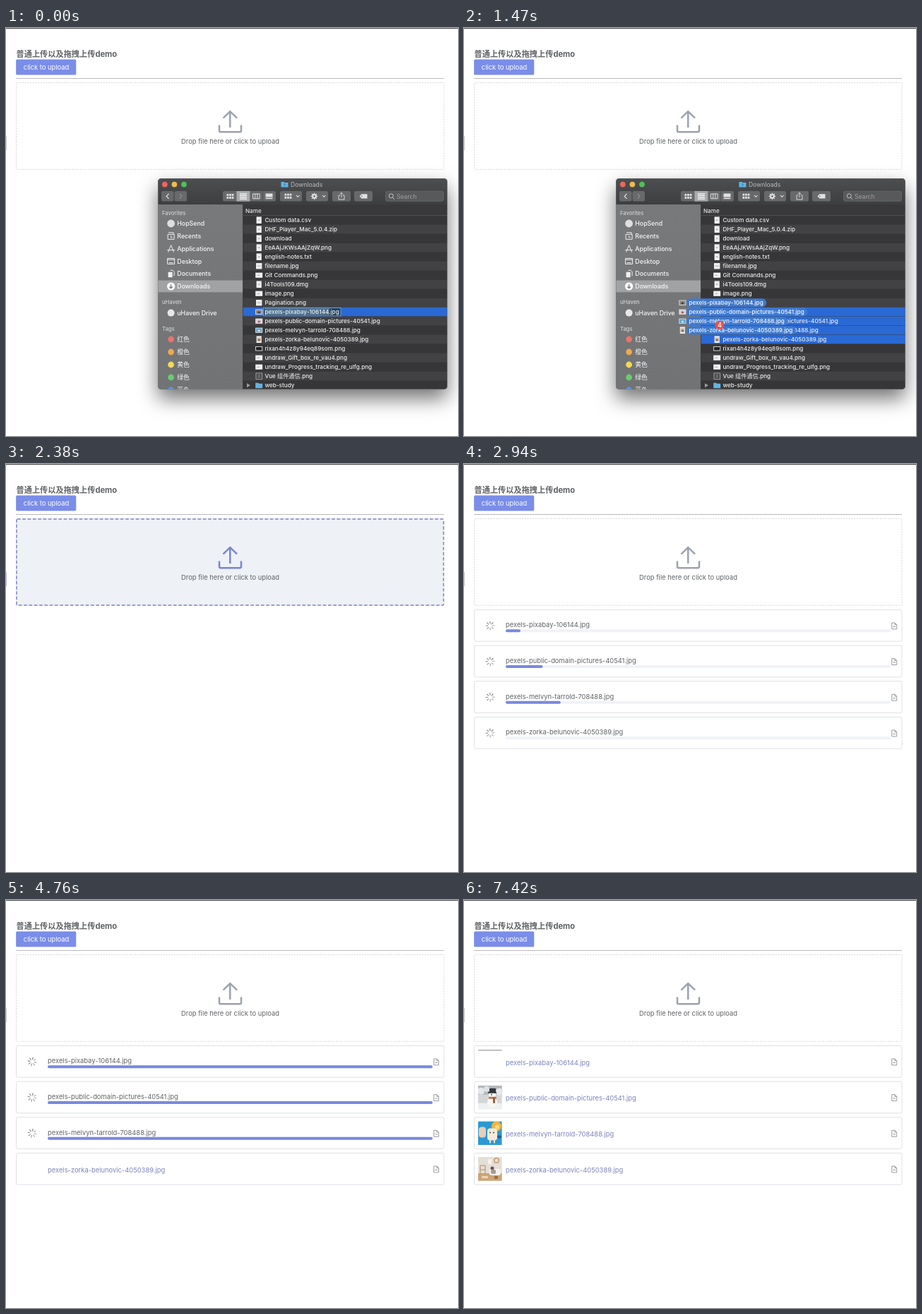
These frames come from a looping animation (640x578 px, 7.49 s). An HTML page:

```html
<!DOCTYPE html>
<html lang="zh">
<head>
<meta charset="utf-8">
<title>Upload demo</title>
<style>
  html, body { margin: 0; width: 100%; height: 100%; overflow: hidden; background: #fff; }
  svg { display: block; }
  text { font-family: Inter, "Noto Sans CJK SC", "Noto Sans CJK", sans-serif; white-space: pre; }
  #finder { filter: drop-shadow(0 13px 14px rgba(0, 0, 0, .55)); }
</style>
</head>
<body>
<svg id="stage" width="640" height="578" viewBox="0 0 640 578"></svg>
<script>
const LOOP = 7490, STEP = 70;

// Drawing helpers
const rect = (x, y, w, h, fill, r = 0, more = '') =>
  `<rect x="${x}" y="${y}" width="${w}" height="${h}" rx="${r}" fill="${fill}" ${more}/>`;
const dot = (x, y, r, fill) => `<circle cx="${x}" cy="${y}" r="${r}" fill="${fill}"/>`;
const line = (d, stroke, w = 1, more = '') =>
  `<path d="${d}" fill="none" stroke="${stroke}" stroke-width="${w}" ${more}/>`;
const label = (x, cy, s, size, fill, weight = 400, more = '') =>
  `<text x="${x}" y="${(cy + size * .36).toFixed(2)}" font-size="${size}" font-weight="${weight}" fill="${fill}" ${more}>${s}</text>`;
const group = (id, body, more = '') => `<g id="${id}" ${more}>${body}</g>`;
const at = (x, y, body) => `<g transform="translate(${x} ${y})">${body}</g>`;

const photos = [
  'pexels-pixabay-106144.jpg',
  'pexels-public-domain-pictures-40541.jpg',
  'pexels-melvyn-tarrold-708488.jpg',
  'pexels-zorka-belunovic-4050389.jpg'
];

// Page
function page() {
  return rect(0, 0, 640, 1, '#46474a') +
    rect(0, 153, 1, 20, '#c9cad0', 0, 'id="edge"') +
    label(14.5, 36.8, '普通上传以及拖拽上传demo', 11.2, '#606266', 700) +
    rect(14, 45.4, 85.5, 21.6, '#e4e7f5', 2) +
    rect(14.2, 44.6, 85, 21.6, '#7a8de8', 1.5) +
    label(24.8, 55.8, 'click to upload', 9.4, '#fff') +
    rect(14, 71, 606, 1, '#b9b9bb') +
    rect(14.5, 77.5, 605.5, 122.8, 'none', 1, 'stroke="#d8d9de" stroke-dasharray="2.2 1.5"') +
    group('hot', rect(15, 78, 604.5, 122, '#eef1f5', 1,
      'stroke="#7f84c8" stroke-width="1.5" stroke-dasharray="4.6 2.7"')) +
    line('M317.3 141V119M307.5 127.6L317.3 118.2L327.1 127.6M302 137.4V145.2Q302 147.2 304 147.2H331Q333 147.2 333 145.2V137.4',
      '#9ba2ae', 2.5, 'id="tray"') +
    label(248, 160.7, 'Drop file here or click to upload', 9.4, '#606266');
}

// Upload cards
const cardY = i => 206.5 + i * 50.67;

const pictures = [
  rect(0, 0, 34, 34, '#aaa3ad'),
  rect(0, 0, 34, 34, '#d3d6d9') + rect(0, 0, 34, 13, '#b3b8bd') +
    dot(4, 8, 5, '#e5e7e9') + dot(12, 5, 4, '#dfe2e4') + dot(30, 9, 5, '#e6e8ea') +
    rect(0, 25, 34, 9, '#eef0f1') + dot(20, 24, 7, '#f7f6f4') + dot(20, 13, 5, '#fbfaf8') +
    rect(16, 4, 9, 6, '#34363d', 1) + rect(14, 9, 12, 2, '#34363d') +
    rect(15, 16, 11, 3, '#c87543', 1) + rect(21, 17, 3, 8, '#9c5a3d') + dot(19, 13, 1, '#4a4543'),
  rect(0, 0, 34, 34, '#2c99d2') + dot(26, 7, 7, '#efb642') + dot(27, 8, 3, '#f8dc79') +
    rect(1, 8, 10, 15, '#e8cfb7', 4) + rect(13, 10, 14, 17, '#f3ead9', 4) +
    dot(17, 16, 1, '#4b4642') + dot(22, 16, 1, '#4b4642') +
    rect(16, 26, 2, 5, '#f0e3cf') + rect(22, 26, 2, 5, '#f0e3cf') + rect(27, 20, 6, 4, '#255a93', 2),
  rect(0, 0, 34, 34, '#e5ded7') + rect(0, 23, 34, 11, '#cda477') +
    rect(14, 3, 5, 7, '#f5f1ec') + dot(26, 5, 4, '#c39a72') + dot(26, 5, 2.5, '#eee2d3') +
    line('M3 25V12H10V25M3 18H10', '#b28b67') + rect(16, 17, 16, 9, '#f5f2ee', 3) +
    dot(20, 16, 2.5, '#66584e') + rect(18, 18, 7, 6, '#a79a90', 2) +
    rect(5, 27, 9, 3, '#ead6bd') + rect(23, 27, 5, 4, '#9b6c45')
];

function spinner() {
  let s = '';
  for (let k = 0; k < 8; k++)
    s += line('M0 -3.2V-6', '#65686e', 1.1, `transform="rotate(${k * 45})" opacity="${.55 + .05 * k}" stroke-linecap="round"`);
  return s;
}

function card(name, i) {
  const y = cardY(i);
  return rect(14.5, y, 605.5, 44.7, '#fff', 2, 'stroke="#dfe1e6"') +
    line(`M605.8 ${y + 18.5}h4.2l2.7 2.7v6.2h-6.9zM610 ${y + 18.5}v2.7h2.7M607.5 ${y + 24}h3.5`, '#8d8f94', .9) +
    group('busy' + i,
      at(37, y + 22.5, group('spin' + i, spinner())) +
      label(59, y + 21.6, name, 9.4, '#606266') +
      rect(59, y + 27.8, 545, 4, '#f1f2f7', 2) +
      rect(59, y + 27.8, 0, 4, '#7889df', 2, `id="bar${i}"`)) +
    group('done' + i, label(59, y + 23.8, name, 9.4, '#7a84bd')) +
    `<svg id="thumb${i}" x="20" y="${y + 5.6}" width="33.6" height="0">${pictures[i]}</svg>`;
}

// File manager: d = document, w = wide image, s = square, p = photo, k = dark frame, q = grid, f = folder
const files = [
  'd Custom data.csv', 'd DHF_Player_Mac_5.0.4.zip', 'd download', 'd EeAAjJKWsAAjZqW.png',
  'd english-notes.txt', 's filename.jpg', 'w Git Commands.png', 'd i4Tools109.dmg',
  'w image.png', 's Pagination.png', ...photos.map(n => 'p ' + n),
  'k rixan4h4z8y94eq89som.png', 'w undraw_Gift_box_re_vau4.png',
  'w undraw_Progress_tracking_re_ulfg.png', 'q Vue 组件通信.png', 'f web-study'
];
const FIRST = 10, FILE_SIZE = 8.17;
const rowY = k => 272.2 + 13 * k;
const photoTone = ['#8e857b', '#d9d3dc', '#5fa8d6', '#d3bda3'];

const folder = () => '<path d="M-5 -3.5h4l1 1h5v6.5h-10z" fill="#63b3e2"/>';

function fileIcon(kind, n = 0) {
  if (kind === 'd') return rect(-3.6, -4.8, 7.2, 9.6, '#f2f2f2') + rect(-1.5, -1, 3, 2, '#b9bbbd') + rect(1.6, -4.8, 2, 2, '#bfc1c3');
  if (kind === 's') return rect(-4.2, -4.2, 8.4, 8.4, '#efefef') + rect(-2.5, -1, 5, 2, '#c9cbcd');
  if (kind === 'w') return rect(-5, -3.6, 10, 7.2, '#f1f1f1') + rect(-3, -.5, 4, 1.2, '#b3b7bd');
  if (kind === 'k') return rect(-4.6, -2.8, 9.2, 5.6, '#222', 0, 'stroke="#e4e4e4" stroke-width=".9"');
  if (kind === 'q') return rect(-4.2, -4.2, 8.4, 8.4, '#3c3d3f', 0, 'stroke="#bbb" stroke-width=".8"') + line('M-3 -1.3H3M-3 1.3H3M0 -3V3', '#999', .7);
  if (kind === 'f') return folder();
  const tall = n === 3;
  return rect(tall ? -3.6 : -5, tall ? -4.8 : -3.6, tall ? 7.2 : 10, tall ? 9.6 : 7.2, '#f0f0f0') +
    rect(tall ? -2.8 : -4.2, -2.8, tall ? 5.6 : 8.4, 5.6, photoTone[n]) +
    rect(-1.5, -.5, 3, 2.5, ['#3d3f42', '#c2524e', '#f0e4cc', '#7e6b59'][n]);
}

function fileRow(entry, k) {
  const kind = entry[0], name = entry.slice(2), n = k - FIRST, y = rowY(k);
  const photo = n >= 0 && n < 4;
  return rect(335.5, y - 6.5, 289.5, 13, k % 2 ? '#424244' : '#363638') +
    (photo ? rect(335.5, y - 6.5, 289.5, 12.7, '#2a69d4', 0, `id="sel${n}"`) : '') +
    (n === 0 ? group('rename', rect(364.5, y - 5.8, 109.5, 11.6, '#24415f', 0, 'stroke="#6c9ee6"') +
      rect(366, y - 5.2, 92, 10.4, '#4d718f')) : '') +
    at(358.2, y, fileIcon(kind, n)) +
    (kind === 'f' ? `<path d="M341 ${y - 3}l5 3l-5 3z" fill="#9b9c9e"/>` : '') +
    label(366.4, y, name, FILE_SIZE, '#ededed', 500);
}

function toolbar() {
  const ink = '#e2e2e2', face = '#68696b';
  const button = (x, w) => rect(x, 231, w, 14.6, face, 2.5);
  const chevron = x => line(`M${x} 237l2.2 2.4l2.2 -2.4`, ink, 1.1);
  let s = dot(224.8, 221.6, 3.9, '#ee655e') + dot(238.4, 221.6, 3.9, '#eebb4a') + dot(252, 221.6, 3.9, '#4fc159') +
    at(394.5, 221.5, folder() + rect(-1, -1.2, 2, 3.2, '#3889be')) + label(403, 221.5, 'Downloads', 8.6, '#bcbdbe') +
    button(220, 17.5) + button(238.5, 17.5) +
    line('M230.5 235l-3.3 3.4l3.3 3.4', ink, 1.2) + line('M245.8 235l3.3 3.4l-3.3 3.4', '#8c8d8f', 1.2) +
    button(307, 75) + rect(326.5, 231, 18.8, 14.6, '#a9aaac') +
    button(388, 31) + button(425, 31) + button(462, 26) + button(493, 26) +
    line('M363.4 231v14.6', '#48494b', .7);
  for (let k = 0; k < 6; k++) s += rect(312.5 + k % 3 * 3.6, 235 + (k / 3 | 0) * 4, 2.7, 2.9, ink);
  for (let k = 0; k < 4; k++) s += rect(331, 234.4 + k * 2.4, 10, 1.2, '#fff');
  s += line('M349.5 235h9.6v6.8h-9.6zM352.7 235v6.8M355.9 235v6.8', ink) +
    rect(367.5, 234.5, 10, 5, ink) + rect(367.5, 240.6, 10, 1.6, ink);
  for (let k = 0; k < 6; k++) s += rect(394.5 + k % 3 * 3.6, 234.7 + (k / 3 | 0) * 4.2, 2.7, 2.9, ink);
  s += chevron(411) + chevron(448) + dot(436.5, 238.4, 3.4, ink) +
    line('M436.5 233.6v9.6M431.7 238.4h9.6M433.1 235l6.8 6.8M439.9 235l-6.8 6.8', ink, 1.1) + dot(436.5, 238.4, 1.3, face) +
    line('M473 237h-2v6h8v-6h-2M475 240v-6.5M473 235.2l2 -2l2 2', ink, .9) +
    `<path d="M500.5 238.4l3 -3.2h8v6.4h-8z" fill="${ink}"/>` + dot(503.8, 238.4, .8, face) +
    rect(537.5, 231.3, 82, 14, '#58595b', 2.5, 'stroke="#6b6c6e" stroke-width=".7"') +
    line('M547.6 240.3l2.4 2.6', '#c5c6c7', 1) + `<circle cx="545.3" cy="237.8" r="3" fill="none" stroke="#c5c6c7"/>` +
    label(553, 238.6, 'Search', 8.6, '#a0a1a3');
  return s;
}

function sidebar() {
  const ink = '#f0f0f0', stroke = d => line(d, ink, 1);
  const icons = [
    dot(0, 0, 5.4, '#dedfe0'),
    stroke('M-3.5 -5h7v2M-4.5 -2.5h9v7h-9zM0 -.5v2.5h2'),
    stroke('M0 -5L-4 5M0 -5L4 5M-5.5 2h11'),
    stroke('M-5 -4h10v8h-10zM-5 -2.2h10M-3 2.2h6'),
    rect(-4, -2.5, 6, 7.5, ink) + stroke('M-1 -5h3.5l2 2v6'),
    dot(0, 0, 5.6, '#fff') + line('M0 -3v5.4M-2.3 .5l2.3 2.3l2.3 -2.3', '#77797b', 1.3)
  ];
  const names = ['HopSend', 'Recents', 'Applications', 'Desktop', 'Documents', 'Downloads'];
  const tags = [['红色', '#ed726a'], ['橙色', '#f0a950'], ['黄色', '#f3d959'], ['绿色', '#69cd6e'], ['蓝色', '#5a97ec']];
  const head = (y, s) => label(221, y, s, 7.6, '#cfd0d1', 500);
  const item = (y, s) => label(242.3, y, s, 8.8, '#f6f6f6', 500);
  return rect(215, 250, 120.5, 262, 'url(#side)') + rect(215, 357.5, 120.5, 16.8, '#a1a2a4') +
    head(261.8, 'Favorites') +
    names.map((n, i) => at(233.6, 277 + i * 17.8, icons[i]) + item(277 + i * 17.8, n)).join('') +
    head(388, 'uHaven') + at(233.6, 403.6, dot(0, 0, 5, '#e6e7e8')) + item(403.6, 'uHaven Drive') +
    head(426, 'Tags') +
    tags.map(([n, c], i) => dot(233.6, 441 + i * 18, 4.4, c) + item(441 + i * 18, n)).join('');
}

function finder() {
  const body = rect(215, 213, 410, 299, '#363638') + rect(215, 213, 410, 37.5, 'url(#bar)') + toolbar() +
    sidebar() + files.map(fileRow).join('') +
    rect(335.5, 250.5, 289.5, 15.2, '#39393b') + rect(335.5, 265.2, 289.5, .7, '#57585a') +
    label(339, 258.9, 'Name', 8.1, '#e6e6e6', 500) +
    rect(335, 250, .7, 262, '#3a3a3c');
  return group('finder', `<g clip-path="url(#frame)">${body}</g>` +
    rect(215.3, 213.3, 409.4, 298.4, 'none', 5, 'stroke="#77787a" stroke-width=".6"'));
}

function ghost() {
  return group('ghost', photos.map((n, i) => {
    const y = rowY(FIRST + i);
    return rect(363, y - 6, 0, 12, '#3e7ad2', 6, `id="pill${i}"`) +
      at(357.4, y, fileIcon('p', i)) + label(366.4, y, n, FILE_SIZE, '#fff', 500, `id="drag${i}"`);
  }).join(''), 'opacity=".95"') +
    group('badge', dot(0, 0, 6.2, '#e6534b') + label(0, 0, '4', 8.5, '#fff', 600, 'text-anchor="middle"'));
}

const shade = (id, a, b) => `<linearGradient id="${id}" x2="0" y2="1"><stop stop-color="${a}"/><stop offset="1" stop-color="${b}"/></linearGradient>`;
const $ = id => document.getElementById(id);

$('stage').innerHTML =
  `<defs>${shade('bar', '#4d4e50', '#3d3e40')}${shade('side', '#77797b', '#717375')}
   <clipPath id="frame">${rect(215, 213, 410, 299, '#fff', 5)}</clipPath></defs>` +
  page() + group('cards', photos.map(card).join('')) + finder() + ghost();

photos.forEach((_, i) => $('pill' + i).setAttribute('width', $('drag' + i).getComputedTextLength() + 8));

// Motion: [time, value] tables
function ramp(t, keys) {
  if (t <= keys[0][0]) return keys[0][1];
  for (let i = 1; i < keys.length; i++) {
    const [a, u] = keys[i - 1], [b, v] = keys[i];
    if (t < b) return u + (v - u) * (t - a) / (b - a);
  }
  return keys[keys.length - 1][1];
}

const move = {
  gx: [[1190, 0], [1470, -48], [1820, -180], [1960, -190]],
  gy: [[1190, 0], [1330, -2], [1470, -13], [1820, -255], [1960, -268]],
  bx: [[1190, 412], [1470, 362], [1820, 215], [1960, 205]],
  by: [[1190, 434], [1330, 432], [1470, 421], [1820, 178], [1960, 165]],
  hot: [[1680, 0], [1820, 1], [2590, 1], [2800, 0]]
};
const progress = [
  [[2800, 0], [3640, .231], [4200, .62], [4690, 1]],
  [[2730, 0], [3640, .417], [4130, .75], [4550, 1]],
  [[2660, 0], [3640, .5], [4060, .8], [4410, 1]],
  [[3640, 0], [3990, .55], [4410, 1]]
];
const doneAt = [5740, 5460, 5110, 4620];
const reveal = [
  [[6860, 0], [7000, 1.5]],
  [[5880, 0], [6720, 33.6]],
  [[5460, 0], [6230, 33.6]],
  [[4900, 0], [5600, 33.6]]
];

const show = (id, on) => { $(id).style.display = on ? '' : 'none'; };
const mix = (a, b, k) => `rgb(${a.map((v, i) => Math.round(v + (b[i] - v) * k))})`;

function draw(t) {
  const dragging = t >= 1190 && t < 2170;
  show('rename', t < 350);
  for (let i = 1; i < 4; i++) show('sel' + i, t >= 630);
  show('finder', t < 2240);
  show('ghost', dragging);
  show('badge', dragging);
  $('ghost').setAttribute('transform', `translate(${ramp(t, move.gx)} ${ramp(t, move.gy)})`);
  $('badge').setAttribute('transform', `translate(${ramp(t, move.bx)} ${ramp(t, move.by)})`);

  const hot = ramp(t, move.hot);
  $('hot').setAttribute('opacity', hot);
  $('tray').setAttribute('stroke', mix([155, 162, 174], [119, 134, 207], hot));
  $('edge').setAttribute('fill', mix([201, 202, 208], [190, 180, 218], hot));

  show('cards', t >= 2450);
  for (let i = 0; i < 4; i++) {
    const done = t >= doneAt[i];
    show('busy' + i, !done);
    show('done' + i, done);
    $('bar' + i).setAttribute('width', 545 * ramp(t, progress[i]));
    $('spin' + i).setAttribute('transform', `rotate(${(t - 2450) * .18})`);
    $('thumb' + i).setAttribute('height', ramp(t, reveal[i]));
  }
}

function tick() {
  const t = performance.now() % LOOP;
  draw(Math.floor(t / STEP) * STEP);
  requestAnimationFrame(tick);
}
tick();
</script>
</body>
</html>
```
